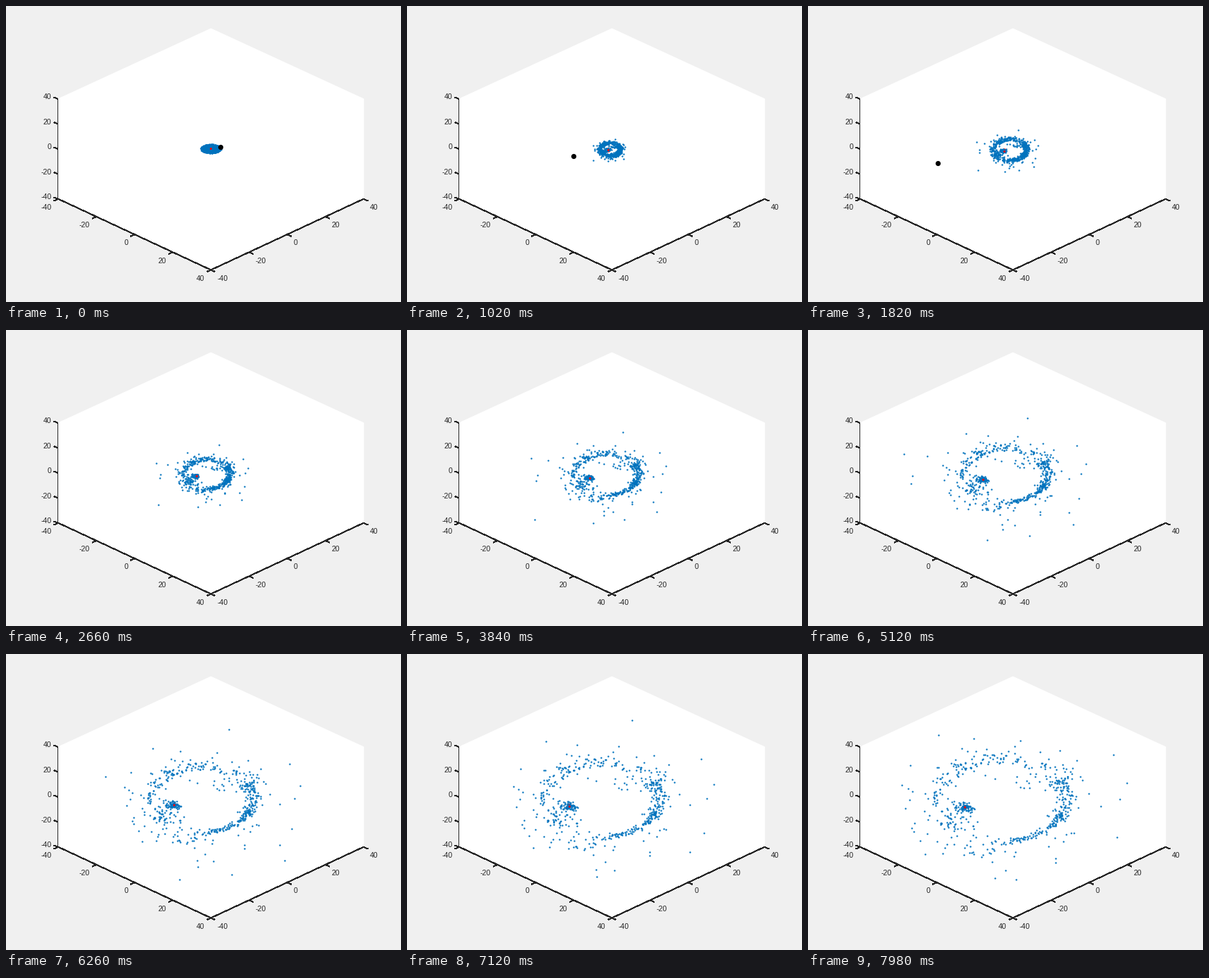
A matplotlib script for the animation above (8000 ms loop, 560 by 420 pixels).

```python
import numpy as np
import matplotlib.pyplot as plt
from matplotlib.animation import FuncAnimation

W, H, DPI = 560, 420, 100
PX = 72 / DPI
FRAMES = 400
KICK, LAST = 7, 399          # start of the free flight, last step
INK, BLUE = "#262626", "#0072bd"
HUB = np.array([290.0, 202.0])
rng = np.random.default_rng(12)

plt.rcParams["font.family"] = "Liberation Sans"
fig = plt.figure(figsize=(W / DPI, H / DPI), dpi=DPI, facecolor="#f0f0f0")
ax = fig.add_axes([0, 0, 1, 1])
ax.set_xlim(-0.5, W - 0.5)
ax.set_ylim(H - 0.5, -0.5)
ax.axis("off")


def project(a, b, z):
    """Box coordinates (-40..40) to stage pixels."""
    return (290 + 217 * (a + b) / 80,
            202.5 + 100.5 * (a - b) / 80 - 142 * z / 80)


def draw_box():
    ax.fill([73, 290, 507, 507, 290, 73], [131, 31, 131, 273, 374, 273],
            color="white", lw=0)
    line = dict(color=INK, lw=PX, solid_capstyle="butt", antialiased=False)
    ax.plot([73, 73, 290, 507], [131, 273, 374, 273], **line)
    for v in range(-40, 41, 20):
        edges = [
            (project(-40, -40, v), (-5.5, -2.5), (-9, -3.8), "right"),
            (project(v, -40, -40), (-5.5, 2.5), (-9, 11.2), "right"),
            (project(40, v, -40), (5.5, 2.5), (8.6, 11.2), "left"),
        ]
        for (x, y), (dx, dy), (tx, ty), ha in edges:
            ax.plot([x, x + dx], [y, y + dy], **line)
            ax.text(x + tx, y + ty, str(v), ha=ha, va="center_baseline",
                    size=10.5 * PX, color=INK)


def wedge(lo, hi, radius):
    """Points at random angles; radius is relative to the final ring."""
    a = rng.uniform(lo, hi, len(radius))
    return np.c_[273 + 92 * radius * np.cos(a), 206 + 60 * radius * np.sin(a)]


def blob(x, y, n, spread):
    return rng.normal((x, y), spread, (n, 2))


# Where the stars end up: angle range, count, radial mean and spread
ring = np.vstack([
    wedge(lo, hi, rng.normal(mean, spread, n))
    for lo, hi, n, mean, spread in [
        (-0.5, 0.5, 110, 1.0, 0.09),     # dense right side
        (0.3, 1.45, 95, 0.98, 0.035),    # thin lower arc
        (-2.3, -0.4, 95, 1.0, 0.11),     # top
        (-3.5, -2.2, 60, 1.0, 0.09),     # left
        (1.5, 2.3, 20, 1.05, 0.13),      # bottom
    ]
] + [blob(209, 238, 50, (13, 11))])
tail = blob(219, 218, 60, (7, 5))
strays = np.vstack([
    wedge(-0.8, 3.7, 1.2 + rng.exponential(0.4, 70)),
    wedge(-2.4, -0.8, 1.2 + rng.exponential(0.25, 10)),
    wedge(-2.0, -0.3, rng.uniform(0.35, 0.8, 12)),
])
goal = np.vstack([ring, tail, strays])
N = len(goal)

# The ring starts a little outside the hub, the rest close to it
k = len(ring)
shift = rng.normal(0, 0.8, (N, 2))
shift[:k] = 0.05 * (ring - HUB) + rng.normal(0, (2.2, 1.6), (k, 2))

phi, rad = rng.uniform(0, 2 * np.pi, N), np.sqrt(rng.uniform(0, 1, N))
disc = np.c_[14.5 * rad * np.cos(phi), 6.3 * rad * np.sin(phi)]

# Stars bound to the core
M = 28
orbit_r = rng.uniform(1, 5, M)
orbit_w = rng.uniform(0.08, 0.25, M)
orbit_p = rng.uniform(0, 2 * np.pi, M)


def core_at(t):
    return np.array([290 - 1.44 * np.log1p(np.exp((t - 19) / 8)),
                     201.3 + 0.038 * t])


def stars_at(t):
    s = max(t - KICK, 0) / (LAST - KICK)
    e = np.exp(-(t / 18) ** 2)
    d = disc * e + shift * (1 - e) + (goal - HUB - shift) * s
    # stars that leave the box are no longer drawn
    d[np.hypot(d[:, 0] / 175, d[:, 1] / 122) > 1] = np.nan
    a = orbit_p + orbit_w * t
    bound = core_at(t) + np.c_[orbit_r * np.cos(a), 0.7 * orbit_r * np.sin(a)]
    return np.vstack([HUB + d, bound])


def dot(size, color, z):
    return ax.plot([], [], "o", ms=size * PX, mew=0, color=color, zorder=z)[0]


draw_box()
halo = dot(6.5, "red", 3)
stars = ax.scatter([], [], s=(2.4 * PX) ** 2, c=BLUE, lw=0, zorder=4)
core = dot(3, "red", 5)
ball = dot(7.2, "black", 6)


def update(t):
    x, y = core_at(t)
    halo.set_data([x], [y])
    core.set_data([x], [y + 0.5])
    stars.set_offsets(stars_at(t))
    ball.set_data([303.5 - 1.324 * t], [199.5 + 0.2527 * t])
    ball.set_visible(t <= 91)
    return halo, stars, core, ball


anim = FuncAnimation(fig, update, frames=FRAMES, interval=20,
                     repeat=True, repeat_delay=0)
plt.show()
```
